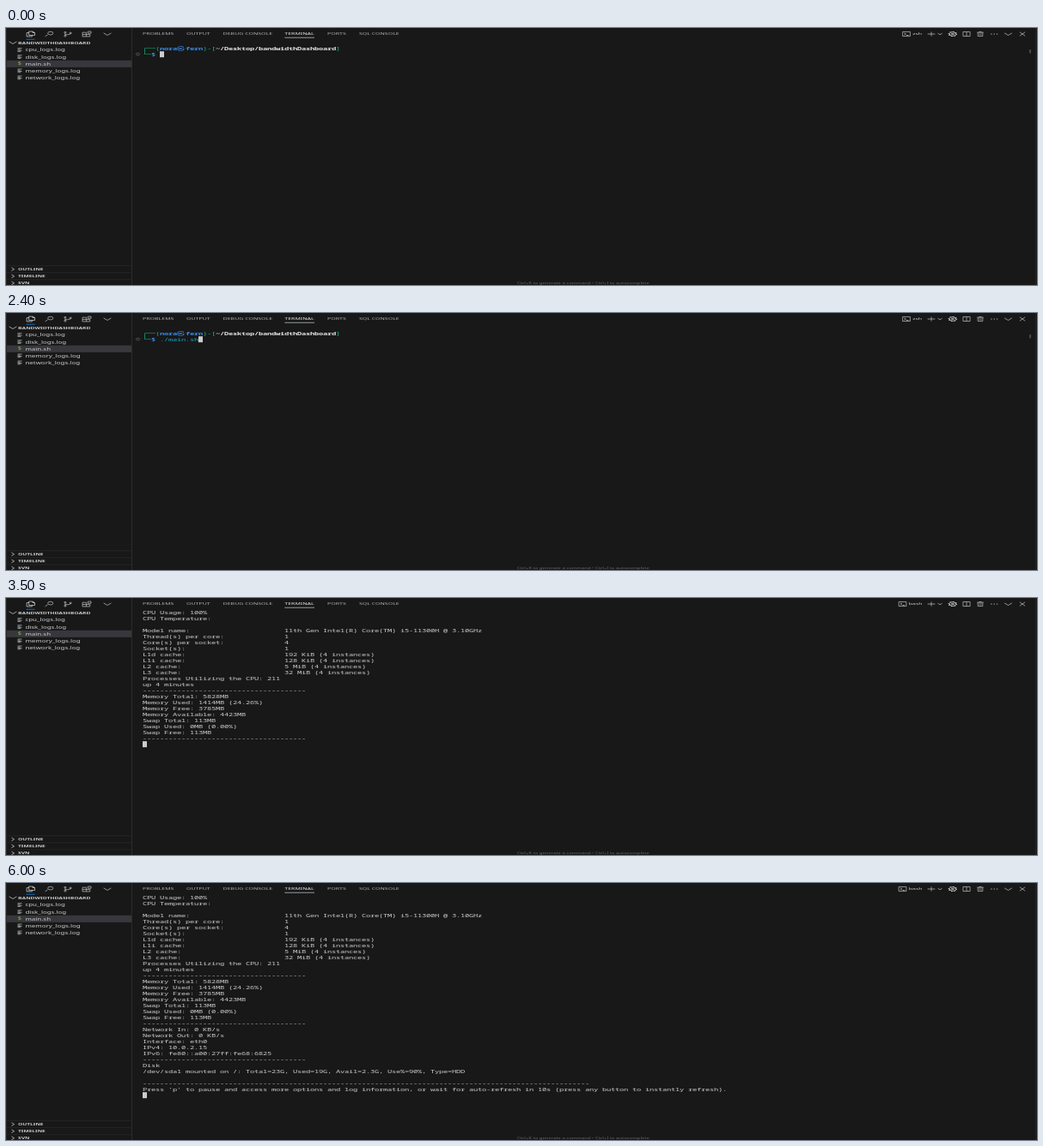
An HTML page with a canvas that plays this animation: 1200 by 300 pixels, repeating every 8 s.

```html
<!DOCTYPE html>
<html lang="en">
<head>
<meta charset="utf-8">
<title>Terminal monitor</title>
<style>
  html, body { margin: 0; width: 100%; height: 100%; overflow: hidden; background: #181818; }
  canvas { display: block; width: 1200px; height: 300px; }
</style>
</head>
<body>
<canvas id="stage"></canvas>
<script>
const W = 1200, H = 300, LOOP = 8000;
const SX = 0.625, SY = 0.368;          // the editor window is squeezed onto the stage
const CELL = 5, ROW = 7, LEFT = 159, TOP = 13.2;
const UI = '"Noto Sans", "Open Sans", sans-serif';
const MONO = '"Noto Sans Mono", "Noto Sans CJK KR", "Noto Sans CJK JP", monospace';

const BG = '#181818', EDGE = '#2b2b2b', FG = '#cccccc';
const GREEN = '#0dbc79', BLUE = '#3b8eea', CYAN = '#11a8cd', WHITE = '#e5e5e5';

const PROJECT = 'bandwidthDashboard', USER = 'nora', HOST = 'fern';
const FILES = ['cpu_logs.log', 'disk_logs.log', 'main.sh', 'memory_logs.log', 'network_logs.log'];

const canvas = document.getElementById('stage');
const ctx = canvas.getContext('2d');
const dpr = window.devicePixelRatio || 1;
canvas.width = W * dpr;
canvas.height = H * dpr;

const field = (name, value) => name.padEnd(33) + value;
const RULE = '-'.repeat(38);
const OUTPUT = [
  'CPU Usage: 100%',
  'CPU Temperature:',
  '',
  field('Model name:', '11th Gen Intel(R) Core(TM) i5-11300H @ 3.10GHz'),
  field('Thread(s) per core:', '1'),
  field('Core(s) per socket:', '4'),
  field('Socket(s):', '1'),
  field('L1d cache:', '192 KiB (4 instances)'),
  field('L1i cache:', '128 KiB (4 instances)'),
  field('L2 cache:', '5 MiB (4 instances)'),
  field('L3 cache:', '32 MiB (4 instances)'),
  'Processes Utilizing the CPU: 211',
  'up 4 minutes',
  RULE,
  'Memory Total: 5828MB',
  'Memory Used: 1414MB (24.26%)',
  'Memory Free: 3785MB',
  'Memory Available: 4423MB',
  'Swap Total: 113MB',
  'Swap Used: 0MB (0.00%)',
  'Swap Free: 113MB',
  RULE,
  'Network In: 0 KB/s',
  'Network Out: 0 KB/s',
  'Interface: eth0',
  'IPv4: 10.0.2.15',
  'IPv6: fe80::a00:27ff:fe68:6825',
  RULE,
  'Disk',
  '/dev/sda1 mounted on /: Total=23G, Used=19G, Avail=2.3G, Use%=90%, Type=HDD',
  '',
  '-'.repeat(104),
  "Press 'p' to pause and access more options and log information, or wait for auto-refresh in 10s (press any button to instantly refresh)."
];

// [start time, number of printed lines]
const PRINTED = [[3000, 3], [3100, 14], [3400, 18], [3500, 22], [4300, 24], [4700, 33]];
// [start time, typed command, colour, weight]
const TYPED = [[0, '', FG, 400], [1400, './main.s', FG, 700], [2400, './main.sh', CYAN, 400]];
const latest = (list, t) => list.filter(step => step[0] <= t).pop();

// Icon outlines on a 16-unit grid centred on the origin
const ICONS = {
  files: 'M-3 -8H4L8 -4V4H-3ZM4 -8V-4H8M-3 -4H-7V8H3V4',
  search: 'M-3 2L-8 8M7 -2.5A5 5 0 1 1 -3 -2.5A5 5 0 1 1 7 -2.5',
  branch: 'M-3 -5A2 2 0 1 1 -7 -5A2 2 0 1 1 -3 -5M-3 6A2 2 0 1 1 -7 6A2 2 0 1 1 -3 6M7 -3A2 2 0 1 1 3 -3A2 2 0 1 1 7 -3M-5 -3V4M5 -1Q5 2 -5 2',
  blocks: 'M-8 -5H-1V8H-8ZM-8 1.5H6V8H-1M2 -8H8V-2H2Z',
  down: 'M-7 -3L0 4L7 -3',
  smallDown: 'M-4 -2L0 2L4 -2',
  right: 'M-2.5 -5L2.5 0L-2.5 5',
  shell: 'M-7 -7H7V7H-7ZM-4 -3L-1 0L-4 3M0 4H4',
  plus: 'M-7 0H7M0 -7V7',
  split: 'M-6.5 -7H6.5V7H-6.5ZM0 -7V7',
  trash: 'M-6 -5H6M-2 -5V-7H2V-5M-4.5 -5V7H4.5V-5M-1.5 -2V4M1.5 -2V4',
  close: 'M-5 -6L5 6M5 -6L-5 6',
  lines: 'M-4 -5H4M-4 -1.7H1M-4 1.7H4M-4 5H2',
  ring: 'M3.5 0A3.5 3.5 0 1 1 -3.5 0A3.5 3.5 0 1 1 3.5 0',
  gear: gearPath()
};

function gearPath() {
  let d = '';
  for (let i = 0; i < 32; i++) {
    const a = (i + 0.5) * Math.PI / 16, r = i % 4 < 2 ? 7.5 : 5.5;
    d += (i ? 'L' : 'M') + r * Math.cos(a) + ' ' + r * Math.sin(a);
  }
  return d + 'ZM2 0A2 2 0 1 1 -2 0A2 2 0 1 1 2 0';
}

function rect(x, y, w, h, color) {
  ctx.fillStyle = color;
  ctx.fillRect(x, y, w, h);
}

function squeezed(x, y, draw) {
  ctx.save();
  ctx.translate(x, y);
  ctx.scale(SX, SY);
  draw();
  ctx.restore();
}

function icon(name, x, y, color = '#c5c5c5', width = 1.4) {
  squeezed(x, y, () => {
    ctx.strokeStyle = color;
    ctx.lineWidth = width;
    ctx.stroke(new Path2D(ICONS[name]));
  });
}

// Text whose capitals are centred on y
function label(str, x, y, size, color = FG, weight = 400) {
  squeezed(x, y, () => {
    ctx.font = `${weight} ${size}px ${UI}`;
    ctx.fillStyle = color;
    ctx.fillText(str, 0, size * 0.357);
  });
}

// Text on the terminal grid; returns the next free column
function cells(str, col, row, color = FG, weight = 400) {
  ctx.font = `${weight} 14px ${MONO}`;
  ctx.fillStyle = color;
  for (const ch of str) {
    if (ch !== ' ') {
      squeezed(LEFT + col * CELL, TOP + row * ROW + 5.5, () => ctx.fillText(ch, 0, 0));
    }
    col += ch === '㉿' ? 2 : 1;
  }
  return col;
}

function cursor(col, row) {
  rect(LEFT + col * CELL, TOP + row * ROW, CELL, ROW, FG);
}

function sidebar() {
  rect(0, 0, 0.8, H, EDGE);
  rect(146, 0, 1, H, EDGE);
  icon('files', 28.5, 7, '#e0e0e0');
  rect(23.5, 12.8, 10, 0.9, '#0078d4');
  icon('search', 50.5, 7);
  icon('branch', 72, 7);
  icon('blocks', 94, 7);
  icon('down', 118, 7);

  icon('down', 8, 17, FG, 1.5);
  label(PROJECT.toUpperCase(), 14, 17.2, 10.75, FG, 700);
  rect(1, 37.8, 145, 8.1, '#37373d');
  FILES.forEach((name, i) => {
    const y = 25.6 + i * 8.08;
    if (name.endsWith('.sh')) label('$', 13.8, y, 12, '#8dc149');
    else icon('lines', 16, y, '#b8bbba', 1.5);
    label(name, 22.4, y + 0.2, 12.7);
  });

  ['OUTLINE', 'TIMELINE', 'SVN'].forEach((name, i) => {
    const y = 281.6 + i * 8.1;
    rect(1, y - 4.3, 145, 0.6, EDGE);
    icon('right', 8, y, FG, 1.5);
    label(name, 14, y + 0.1, 10.6, FG, 700);
  });
}

function panelBar(running) {
  const tabs = [['PROBLEMS', 159], ['OUTPUT', 210], ['DEBUG CONSOLE', 252.6],
                ['TERMINAL', 324.3], ['PORTS', 374], ['SQL CONSOLE', 411]];
  for (const [name, x] of tabs) {
    label(name, x, 7, 11.2, name === 'TERMINAL' ? '#e7e7e7' : '#b0b0b0');
  }
  rect(324.3, 10.8, 34.7, 0.8, '#b0b8c0');

  icon('shell', running ? 1043.5 : 1048, 7);
  label(running ? 'bash' : 'zsh', running ? 1050.8 : 1055.2, 7, 11);
  icon('plus', 1077, 7);
  icon('smallDown', 1087, 7);
  icon('gear', 1101.8, 7, '#d0d0d0', 1.7);
  icon('split', 1118, 7);
  icon('trash', 1134, 7);
  for (let i = -1; i <= 1; i++) rect(1149.6 + i * 3.3, 6.6, 1.3, 0.9, '#c5c5c5');
  icon('down', 1166.5, 7);
  icon('close', 1183, 7);
  rect(1198, 0, 1, H, '#242428');
  label('Ctrl+K to generate a command • Ctrl+I to autocomplete', 595, 297.3, 9.5, '#6a6a6a');
}

function prompt(t) {
  const mid = LEFT + CELL / 2, y1 = TOP + 1.5 * ROW, y2 = TOP + 2.5 * ROW;
  rect(mid - 0.3, y1, 0.7, ROW, GREEN);
  rect(mid, y1 - 0.2, 2.5 * CELL, 0.5, GREEN);
  rect(mid, y2 - 0.2, 1.5 * CELL, 0.5, GREEN);

  let col = cells('(', 3, 1, GREEN);
  col = cells(USER + '㉿' + HOST, col, 1, BLUE, 700);
  col = cells(')-[', col, 1, GREEN);
  col = cells('~/Desktop/' + PROJECT, col, 1, WHITE, 700);
  cells(']', col, 1, GREEN);
  cells('$', 2, 2, BLUE, 700);

  const [, command, color, weight] = latest(TYPED, t);
  cursor(cells(command, 4, 2, color, weight), 2);

  icon('ring', 153.5, 30.5, '#6b6b6b');
  rect(1191.3, 25.2, 1.5, 4.2, '#5c5c5c');
}

function output(t) {
  const count = latest(PRINTED, t)[1];
  OUTPUT.slice(0, count).forEach((line, row) => cells(line, 0, row));
  cursor(0, count);
}

function draw(t) {
  const running = t >= PRINTED[0][0];
  ctx.setTransform(dpr, 0, 0, dpr, 0, 0);
  rect(0, 0, W, H, BG);
  sidebar();
  panelBar(running);
  if (running) output(t);
  else prompt(t);
}

const start = performance.now();
function tick() {
  draw((performance.now() - start) % LOOP);
  requestAnimationFrame(tick);
}
tick();
</script>
</body>
</html>
```
